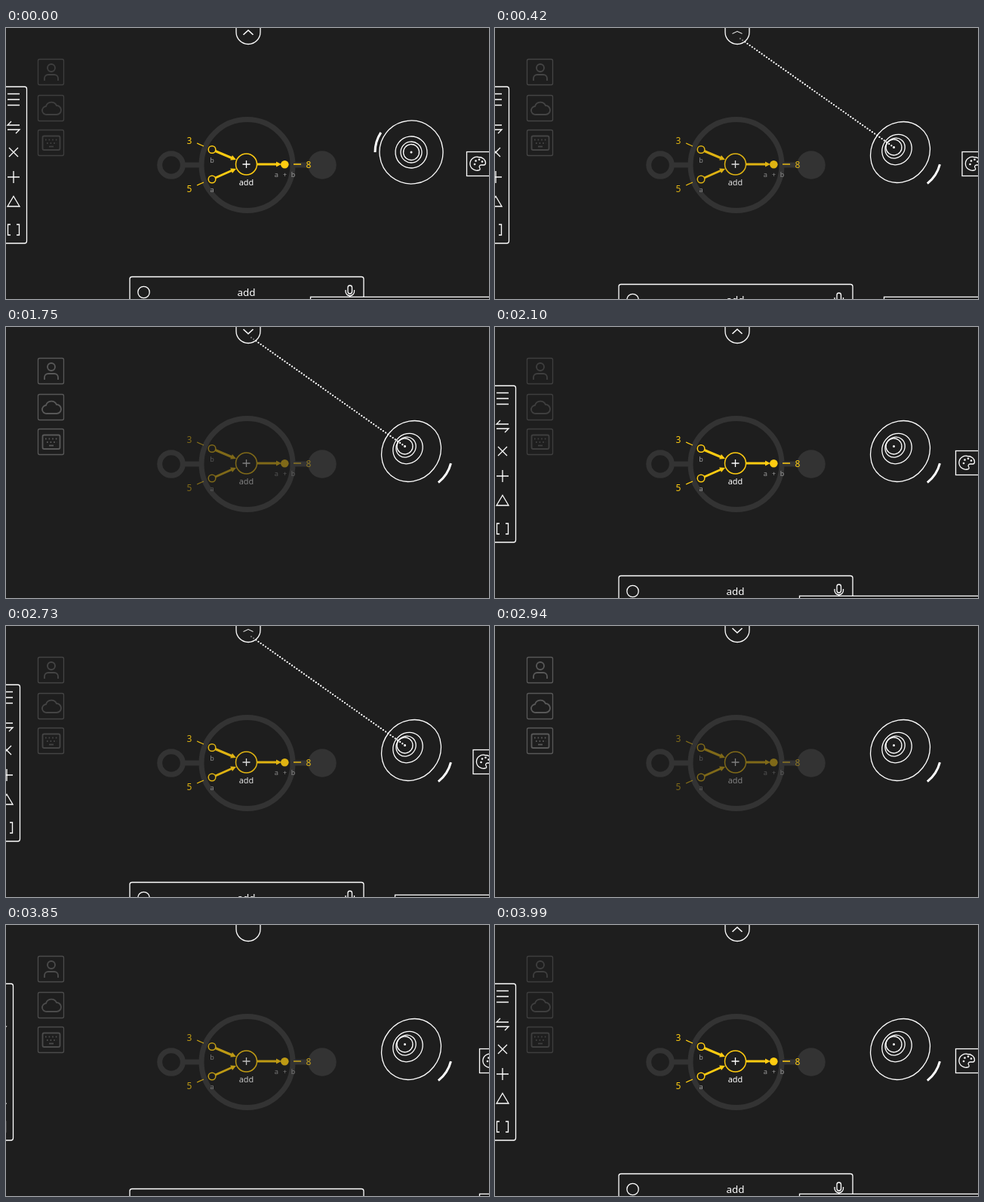
An HTML page for the animation above (4.06 s loop, 640 by 360 pixels).

```html
<!DOCTYPE html>
<html lang="en">
<head>
<meta charset="utf-8">
<title>Gaze menu</title>
<style>
html, body { margin: 0; width: 100%; height: 100%; overflow: hidden; background: #1e1e1e; }
svg { display: block; width: 100%; height: 100%; fill: none; stroke: #fff; stroke-width: 1.3; }
text { font-family: "Noto Sans", sans-serif; fill: #fff; stroke: none; text-anchor: middle; }
.mono { font: 9.3px "Noto Sans Mono", monospace; fill: #999; }
.num { font-size: 12px; fill: #fc1; }
.gold { stroke: #fc1; }
.solid { fill: #fc1; stroke: none; }
.panel { fill: #1e1e1e; }
</style>
</head>
<body>
<svg viewBox="0 0 640 360">
  <g stroke="#333" stroke-width="7">
    <circle cx="319.5" cy="182" r="60.5"/>
    <circle cx="219" cy="182" r="15.3"/>
    <path d="M236 182H257M382 182H404"/>
    <circle cx="419" cy="182" r="18.7" fill="#333" stroke="none"/>
  </g>

  <g id="icons">
    <rect x="42.5" y="41.5" width="34" height="34" rx="2"/>
    <rect x="42.5" y="89.5" width="34" height="34" rx="2"/>
    <rect x="42.5" y="135.5" width="34" height="34" rx="2"/>
    <g stroke-width="1.8">
      <circle cx="60" cy="53" r="5"/>
      <path d="M51 70v-3a5 5 0 0 1 5-5h8a5 5 0 0 1 5 5v3"/>
      <path d="M54 115a5.5 5.5 0 0 1-1-11a7.5 7.5 0 0 1 14-1a6 6 0 0 1 0 12z"/>
      <rect x="48.5" y="143.5" width="23" height="18.500" rx="2"/>
      <path d="M52 148.500H69M54 153H68" stroke-dasharray="1.600 3"/>
      <path d="M57 157.500H63"/>
    </g>
  </g>

  <g id="node">
    <g class="gold">
      <path d="M253 153L262 157M253 209L262 205M381 181H391"/>
      <path d="M277.500 163.500L300 173M277.500 199L300 189M333 181H360" stroke-width="3"/>
      <circle cx="273" cy="161.500" r="4.800" stroke-width="1.500"/>
      <circle cx="273" cy="201" r="4.800" stroke-width="1.500"/>
      <circle cx="318.500" cy="181" r="14" stroke-width="1.500"/>
    </g>
    <g class="solid">
      <path id="head" d="M0 0L-7 -3.500V3.500Z" transform="translate(305 175) rotate(23)"/>
      <use href="#head" transform="matrix(1 0 0 -1 0 362)"/>
      <path d="M365 181l-7 -3.500v7z"/>
      <circle cx="369.300" cy="181.300" r="5.300"/>
    </g>
    <path d="M313.500 181h10M318.500 176v10"/>
    <text class="num" x="243" y="154">3</text>
    <text class="num" x="243" y="218">5</text>
    <text class="num" x="401" y="186">8</text>
    <text class="mono" x="273" y="179">b</text>
    <text class="mono" x="273" y="218">a</text>
    <text class="mono" x="369.500" y="198">a + b</text>
    <text x="318.500" y="208.500" font-size="10.900">add</text>
  </g>

  <g id="left">
    <rect class="panel" x="-20" y="78" width="47.500" height="208" rx="3"/>
    <path d="M2 87.500H18M2 95H18M2 102.500H18
      M7 124L2 129H18M2 135H18L13 140
      M4 159L16 171M16 159L4 171
      M2 198H18M10 190V206
      M10 223.500L18 237H2Z
      M6 261H2.500V275H6M14 261H17.500V275H14"/>
  </g>

  <g id="right">
    <rect class="panel" x="610.500" y="164.500" width="60" height="32"/>
    <path d="M626 171.500a9 9 0 1 0 0 17.500c2.500 0 2.500-2 1.500-3.500s0-3.500 2-3.500h3.500c2 0 2.500-1.500 2.500-3c0-4-4-7.500-9.500-7.500z"/>
    <g fill="#fff" stroke="none">
      <circle cx="621" cy="181" r="1.300"/><circle cx="622.500" cy="176.500" r="1.300"/>
      <circle cx="627" cy="174.800" r="1.300"/><circle cx="631" cy="177.500" r="1.300"/>
    </g>
  </g>

  <g id="bottom">
    <rect class="panel" x="164" y="330.500" width="310" height="60" rx="3"/>
    <circle cx="182.500" cy="351" r="7.700"/>
    <text x="318.500" y="356" font-size="13.400">add</text>
    <rect x="453" y="342" width="5.500" height="11" rx="2.750"/>
    <path d="M450 348v2a5.700 5.700 0 0 0 11.500 0v-2M455.750 356v4"/>
  </g>
  <rect id="corner" class="panel" x="403.500" y="357.300" width="300" height="30"/>

  <path id="ray" stroke-width="2.300" stroke-linecap="round" stroke-dasharray="0 3.900"/>
  <path d="M305 -2V5.500a16 16 0 0 0 32 0V-2" fill="#1e1e1e" fill-opacity=".6"/>
  <path id="chevron" d="M-6.500 3L0 -3L6.500 3" stroke-width="1.600"/>

  <g id="eye">
    <ellipse/><ellipse/><ellipse/><ellipse/>
    <circle r="1.500" fill="#fff" stroke="none"/>
    <path id="arc" stroke-width="3"/>
  </g>
</svg>
<script>
const LOOP = 4060, STEP = 70, FADE = 4 * STEP;
const CX = 537, CY = 165, TILT = 38;
const get = id => document.getElementById(id);
const rings = [...document.querySelectorAll("#eye ellipse")];
const pupil = document.querySelector("#eye circle");
// radius and share of the pupil's shift
const ringSpec = [[42, 0], [21, .53], [14, .82], [10.5, 1]];
const rayStarts = [280, 1750, 2590, 3640];

const mix = (a, b, p) => a + (b - a) * p;
const ramp = (t, start) => Math.min(1, Math.max(0, (t - start + STEP) / FADE));
const move = (id, x, y) => get(id).setAttribute("transform", `translate(${x} ${y})`);
const set = (el, attrs) => { for (const k in attrs) el.setAttribute(k, attrs[k]); };

function drawEye(p) {
  const dx = -8.5 * p, dy = -6.5 * p;
  rings.forEach((el, i) => {
    const [r, share] = ringSpec[i];
    const squash = i === 3 ? 0 : .1;
    set(el, {
      rx: r * (1 - squash * p), ry: r,
      transform: `translate(${CX + dx * share} ${CY + dy * share}) rotate(${TILT})`
    });
  });
  set(pupil, { cx: CX + dx, cy: CY + dy });

  const mid = mix(196.5, 33, p), half = mix(16.5, 18.5, p);
  const point = deg => {
    const a = deg * Math.PI / 180;
    return `${CX + 6 * p + 48 * Math.cos(a)} ${CY + 4 * p + 48 * Math.sin(a)}`;
  };
  get("arc").setAttribute("d", `M${point(mid - half)}A48 48 0 0 1 ${point(mid + half)}`);
  get("ray").setAttribute("d", `M${CX + dx} ${CY + dy}L322 12`);
}

function draw(time) {
  const t = Math.floor(time % LOOP / STEP) * STEP;
  const hide = ramp(t, 420) - ramp(t, 1890) + ramp(t, 2730) - ramp(t, 3780);
  drawEye(ramp(t, 140));
  move("left", -36 * hide, 0);
  move("right", 34 * hide, 0);
  move("bottom", 0, 40 * hide);
  move("corner", 448 * hide, 0);
  get("node").setAttribute("opacity", mix(1, .43, hide));
  get("icons").setAttribute("opacity", mix(.14, .26, hide));
  get("chevron").setAttribute("transform", `translate(321 6) scale(1 ${1 - 2 * hide})`);
  const lit = rayStarts.some(s => t >= s && t < s + 3 * STEP);
  get("ray").setAttribute("visibility", lit ? "visible" : "hidden");
}

const begin = performance.now();
function tick() {
  draw(performance.now() - begin);
  requestAnimationFrame(tick);
}
tick();
</script>
</body>
</html>
```
